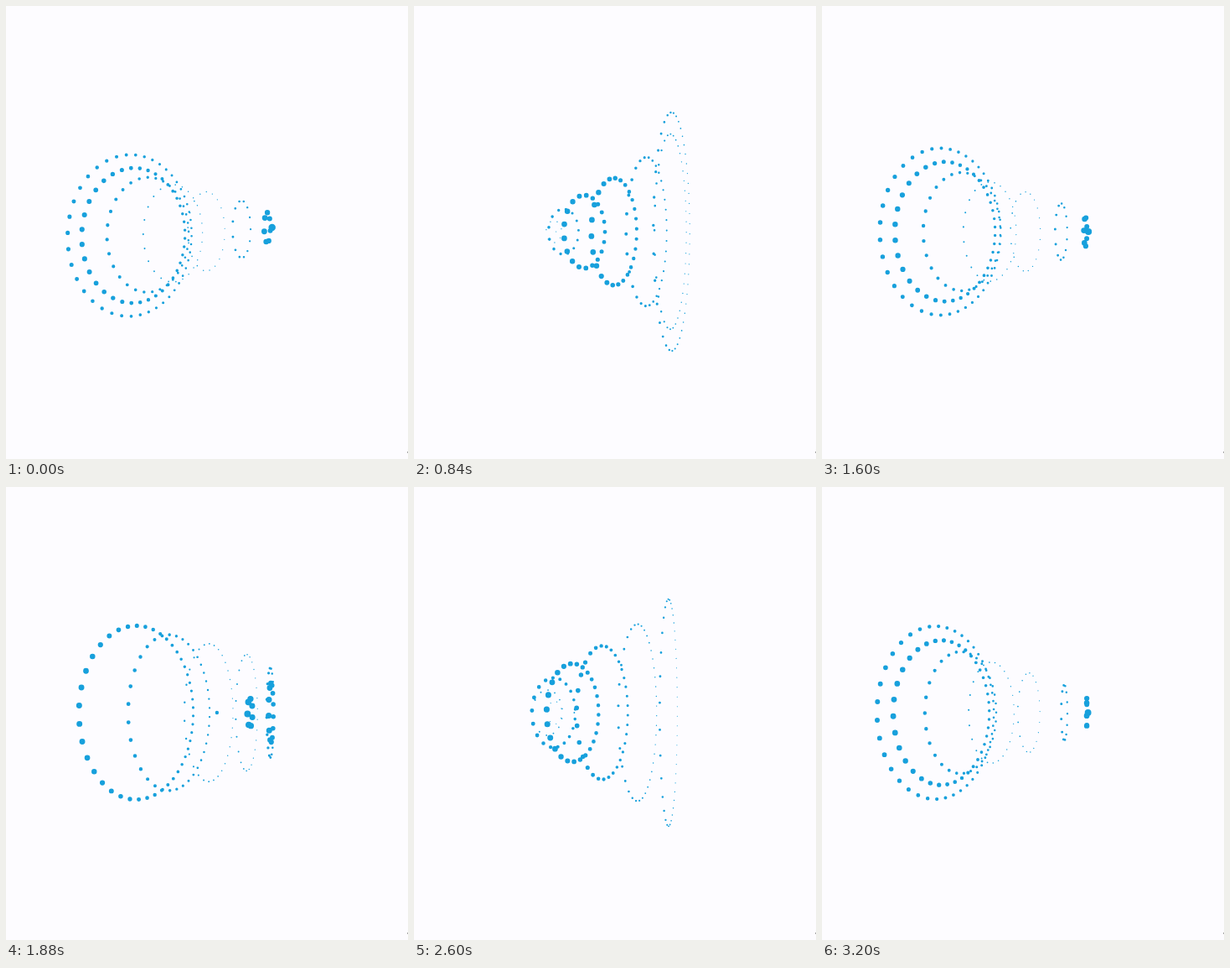
An HTML page with a canvas that plays this animation: 480x540 px, repeating every 3240 ms.

```html
<!DOCTYPE html>
<html>
<head>
<meta charset="utf-8">
<style>
html, body { margin: 0; width: 100%; height: 100%; overflow: hidden; background: #fdfcff; }
canvas { display: block; width: 480px; height: 540px; }
</style>
</head>
<body>
<canvas id="stage"></canvas>
<script>
const LOOP = 3240, STEP = 40, RINGS = 7;
const FOCAL = 235, DISTANCE = 15.4, CX = 237, CY = 269;
// [seconds, degrees] of the disc's wobble about its own axis
const SPIN = [[0, -14.4], [0.84, 10], [1.28, 15], [1.88, -5], [2.36, 6], [2.92, -1], [3.24, -13]];

const canvas = document.getElementById('stage');
const ctx = canvas.getContext('2d');
const dpr = window.devicePixelRatio || 1;
canvas.width = 480 * dpr;
canvas.height = 540 * dpr;
ctx.scale(dpr, dpr);

function spinAt(s) {
  const i = Math.max(1, SPIN.findIndex(key => key[0] >= s));
  const [s0, a0] = SPIN[i - 1], [s1, a1] = SPIN[i];
  return (a0 + (a1 - a0) * (s - s0) / (s1 - s0)) * Math.PI / 180;
}

function draw(s) {
  const yaw = 0.505 - 0.055 * s;
  const vx = Math.sin(yaw), vz = Math.cos(yaw);
  const tilt = 0.055 * Math.exp(-s / 0.15);
  const start = Math.PI + spinAt(s);
  const phase = 3.95 * s + 0.16;

  ctx.fillStyle = '#fdfcff';
  ctx.fillRect(0, 0, 480, 540);
  ctx.fillStyle = '#aaa';
  ctx.fillRect(479, 531, 1, 2);

  ctx.fillStyle = '#17a0dc';
  ctx.beginPath();
  for (let ring = 0; ring <= RINGS; ring++) {
    // The dot size ripples at twice the spatial rate of the height
    const height = -0.45 + 5.6 * Math.cos(phase - ring * Math.PI / 6);
    const swell = (1 + Math.cos(phase - ring * Math.PI / 3)) / 2;
    const size = 0.045 + 0.19 * (1 - 0.055 * ring) * swell ** 1.5;
    const count = Math.ceil(2 * Math.PI * ring) || 1;
    for (let j = 0; j < count; j++) {
      const a = start + j / count * 2 * Math.PI;
      const across = ring * Math.cos(a);
      const scale = FOCAL / (DISTANCE + across * vz - height * vx);
      const x = CX + scale * (across * vx + height * vz);
      const y = CY + scale * (ring * Math.sin(a) - tilt * height);
      const r = size * scale;
      ctx.moveTo(x + r, y);
      ctx.arc(x, y, r, 0, 2 * Math.PI);
    }
  }
  ctx.fill();
}

const begin = performance.now();
function frame() {
  const t = (performance.now() - begin) % LOOP;
  draw(Math.floor(t / STEP) * STEP / 1000);
  requestAnimationFrame(frame);
}
frame();
</script>
</body>
</html>
```
